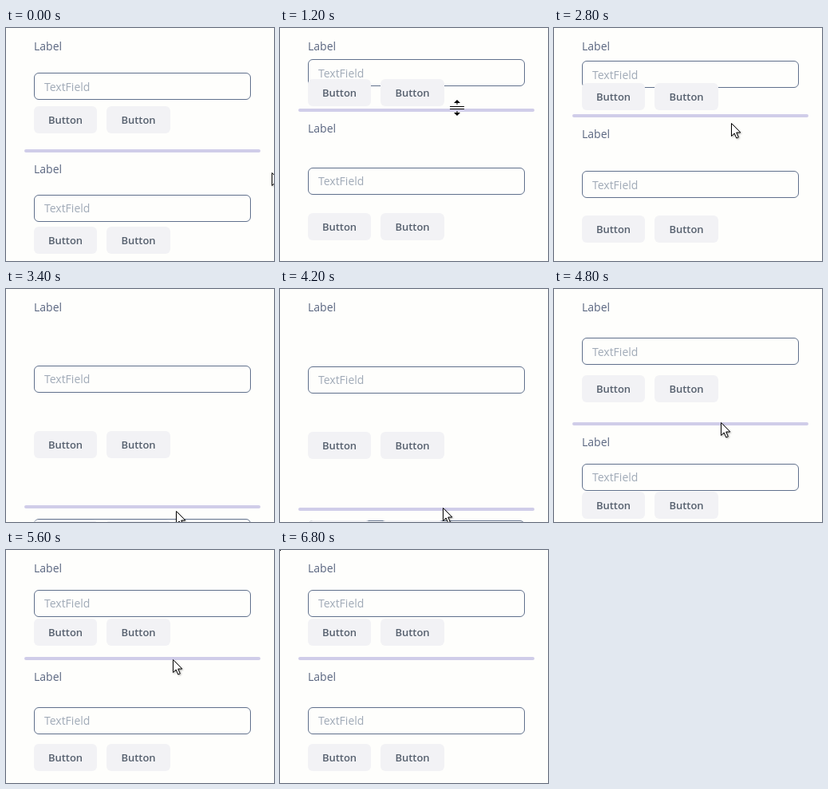
Recreate the animation shown at these times as an HTML page. Size 336 px wide and 292 px high, loop 7.2 s.

```html
<!DOCTYPE html>
<html lang="en">
<head>
<meta charset="utf-8">
<title>Split layout</title>
<style>
  html, body { margin: 0; width: 100%; height: 100%; overflow: hidden; background: #fefefc; }
  #stage { position: relative; width: 336px; height: 292px; overflow: hidden; font: 14px/20px "Open Sans", "Noto Sans", sans-serif; }
  #stage * { box-sizing: border-box; }
  .pane { position: absolute; left: 0; top: 0; width: 336px; height: 292px; overflow: hidden; }
  .pane > * { position: absolute; top: 0; white-space: nowrap; }
  .label { left: 35px; color: #5a6680; }
  .field { left: 35px; width: 272px; height: 34px; background: #fefefc; border: 1px solid #60708c; border-radius: 6px; }
  .hint { left: 48px; line-height: 35px; color: #a0aab7; }
  .button { width: 79px; height: 34px; border-radius: 6px; background: #f2f2f5; color: #56606e; font-size: 13px; font-weight: 600; line-height: 34px; text-align: center; }
  .button.a { left: 35px; }
  .button.b { left: 126px; width: 80px; }
  #bar { position: absolute; left: 23px; top: 0; width: 296px; height: 4px; border-radius: 2px; background: #d0cde9; }
  svg { position: absolute; left: 0; top: 0; overflow: visible; }
  #arrow { filter: drop-shadow(1px 1px 1px rgba(0, 0, 0, .35)); }
  #dot { position: absolute; left: 0; top: 0; width: 1px; height: 1px; background: #000; }
</style>
</head>
<body>
<div id="stage">
  <div class="pane"></div>
  <div class="pane"></div>
  <div id="bar"></div>
  <svg id="arrow" width="13" height="21">
    <path d="M.5 .5V16.5L4.2 13L6.8 19L9.3 17.9L6.7 12H11.8Z" fill="#fff" stroke="#000"/>
  </svg>
  <svg id="resize" width="20" height="22">
    <path d="M-9 -1.5H9M-9 1.5H9M0 -4V-8M0 4V8" fill="none" stroke="#000"/>
    <path d="M-4 -6L0 -10L4 -6ZM-4 6L0 10L4 6Z"/>
  </svg>
  <div id="dot"></div>
</div>
<script>
const LOOP = 7200, STEP = 200, LEAD = 25;

const $ = id => document.getElementById(id);
const move = (el, x, y) => { el.style.transform = `translate(${x}px, ${y}px)`; };
const show = (el, on) => { el.style.visibility = on ? "visible" : "hidden"; };
const ramp = (t, start, length) => Math.min(1, Math.max(0, (t - start) / length));
const ease = (t, start, length) => (1 - Math.cos(Math.PI * ramp(t, start, length))) / 2;

function fill(pane) {
  const add = (cls, text = "") => {
    const el = document.createElement("div");
    el.className = cls;
    el.textContent = text;
    return pane.appendChild(el);
  };
  const label = add("label", "Label");
  const field = add("field");
  const hint = add("hint", "TextField");
  const buttons = [add("button a", "Button"), add("button b", "Button")];
  return (labelY, fieldY, buttonY) => {
    move(label, 0, labelY);
    move(field, 0, Math.round(fieldY));
    move(hint, 0, Math.floor(fieldY)); // text snaps down, boxes to the nearest pixel
    for (const b of buttons) move(b, 0, Math.round(buttonY));
  };
}

const panes = document.querySelectorAll(".pane");
const [placeTop, placeBottom] = [...panes].map(fill);

// Divider centre: dragged up, down, up again and nudged.
function splitAt(t) {
  return 154
    - 150 * ease(t, 600, 1515)
    + 284 * ease(t, 2224, 1376)
    - 140 * ease(t, 3995, 1080)
    - 12.2 * ease(t, 5200, 400);
}

// The pointer comes in from the right, leads the divider, then leaves upwards.
function pointerAt(t) {
  const enter = ease(t, 0, 600), leave = ramp(t, 5600, 1000) ** 3;
  const x = 333 - 111 * enter - 18 * ease(t, 2800, 1200) + 5 * ease(t, 4200, 600) + 66 * leave;
  const y = splitAt(t + LEAD) + 1 + 26 * (1 - enter) - 117 * leave;
  return [Math.round(x), Math.round(y)];
}

function draw(now) {
  const t = Math.floor(now % LOOP / STEP) * STEP;
  const split = splitAt(t), third = split / 3, line = Math.round(split);

  // Spare height is shared evenly between the rows of each pane.
  panes[0].style.height = Math.max(0, line - 2) + "px";
  placeTop(13, third + 4.67, 2 * third - 4.67);
  placeBottom(line + 13, 2 * third + 106, third + 198);
  move($("bar"), 0, line - 2);

  const gone = t >= 6800;
  const resizing = t >= 600 && t <= 1800;
  const [x, y] = pointerAt(t);
  move($("arrow"), x, y);
  move($("resize"), x, y);
  show($("arrow"), !gone && !resizing);
  show($("resize"), resizing);
  show($("dot"), gone);
}

const start = performance.now();
function tick() {
  draw(performance.now() - start);
  requestAnimationFrame(tick);
}
tick();
</script>
</body>
</html>
```
